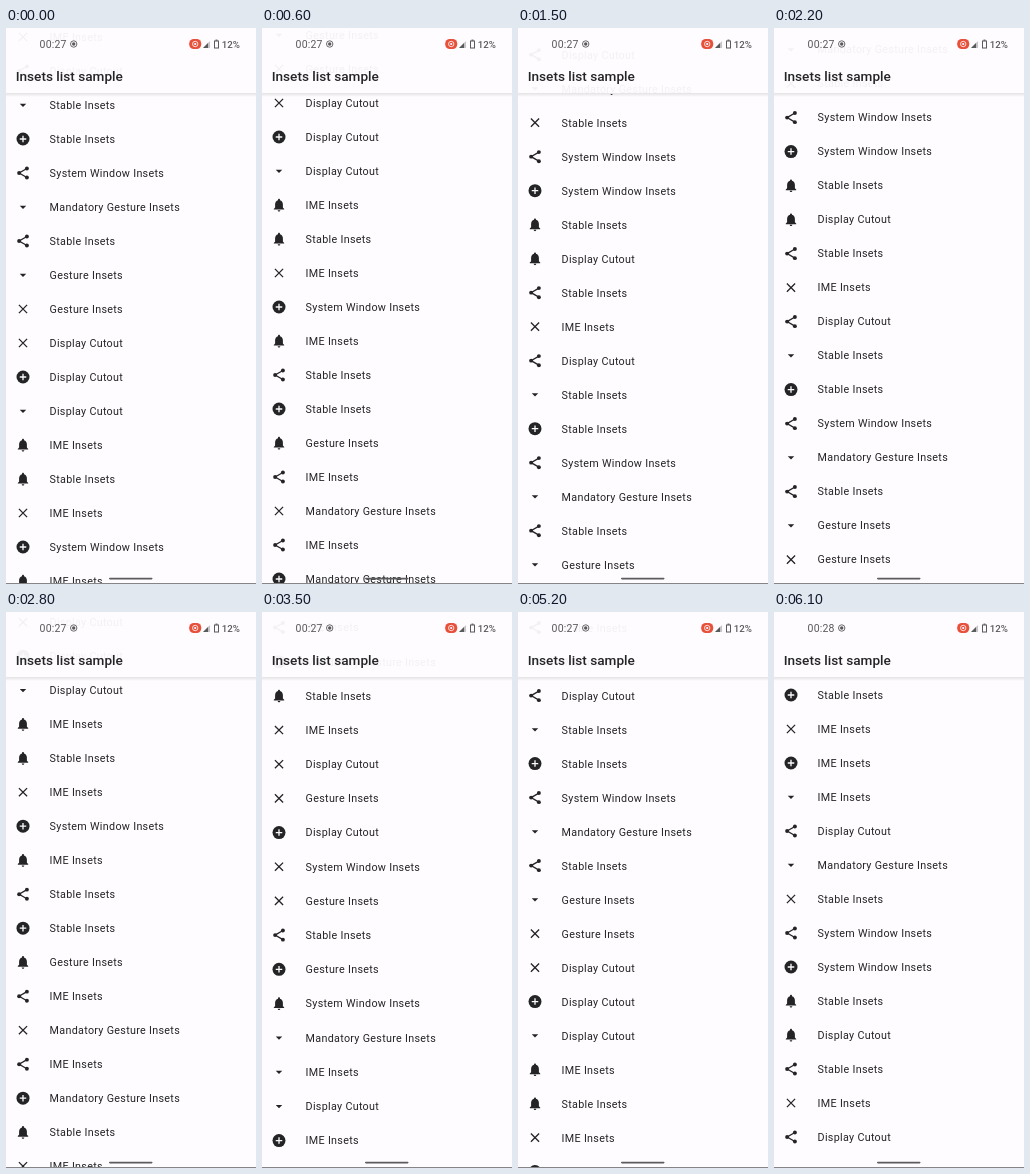
These frames come from a looping animation (250 px wide and 556 px high, 6200 ms). An HTML page with a canvas:

```html
<!DOCTYPE html>
<html lang="en">
<head>
<meta charset="utf-8">
<title>Insets list sample</title>
<style>
  html, body { margin: 0; width: 100%; height: 100%; overflow: hidden; background: #fefcfe; }
  canvas { display: block; width: 250px; height: 556px; }
</style>
</head>
<body>
<canvas id="stage"></canvas>
<script>
const W = 250, H = 556, LOOP = 6200, STEP = 100;
const ROW = 34, FIRST_Y = 83, MAX_SCROLL = 1220, BAR_BOTTOM = 66;
const INK = '#242326', GRAY = '#5a595c', PAPER = '#fefcfe';

const canvas = document.getElementById('stage');
const ctx = canvas.getContext('2d');
const ratio = window.devicePixelRatio || 1;
canvas.width = W * ratio;
canvas.height = H * ratio;

const LABELS = {
  S: 'Stable Insets', W: 'System Window Insets', M: 'Mandatory Gesture Insets',
  G: 'Gesture Insets', D: 'Display Cutout', I: 'IME Insets'
};

// Each row is an icon key followed by a label key.
const ROWS = (
  '+S xI +I vI <D vM xS <W +W bS bD <S xI <D vS +S <W vM <S vG xG xD +D vD bI ' +
  'bS xI +W bI <S +S bG <I xM <I +M bS xI xD xG +D xW xG <S +G bW vM vI vD +I'
).split(' ');

const settle = u => 1 - (1 - u) ** 2;
const gather = u => u ** 1.44;
const linear = u => u;
const smooth = u => u * u * (3 - 2 * u);

// Swipes run one after another; the list rests between them.
const TURN = 738;
const SWIPES = [
  { start: 0, end: 800, from: 482, to: TURN, ease: settle },
  { start: 900, end: 1640, from: TURN, to: 0, ease: gather },
  { start: 1950, end: 3268, from: 0, to: MAX_SCROLL, ease: linear },
  { start: 4500, end: 5680, from: MAX_SCROLL, to: 0, ease: smooth }
];

const BELL = new Path2D(
  'M12 22c1.1 0 2-.9 2-2h-4c0 1.1.89 2 2 2zm6-6v-5c0-3.07-1.64-5.64-4.5-6.32V4' +
  'c0-.83-.67-1.5-1.5-1.5s-1.5.67-1.5 1.5v.68C7.63 5.36 6 7.92 6 11v5l-2 2v1h16v-1l-2-2z');

function disc(x, y, r, color) {
  ctx.fillStyle = color;
  ctx.beginPath();
  ctx.arc(x, y, r, 0, Math.PI * 2);
  ctx.fill();
}

function ring(x, y, r, color, width) {
  ctx.strokeStyle = color;
  ctx.lineWidth = width;
  ctx.beginPath();
  ctx.arc(x, y, r, 0, Math.PI * 2);
  ctx.stroke();
}

function roundBox(x, y, w, h, r, color) {
  ctx.fillStyle = color;
  ctx.beginPath();
  ctx.roundRect(x, y, w, h, r);
  ctx.fill();
}

function strokes(...paths) {
  ctx.lineWidth = 2;
  ctx.beginPath();
  for (const [start, ...rest] of paths) {
    ctx.moveTo(...start);
    for (const point of rest) ctx.lineTo(...point);
  }
  ctx.stroke();
}

function polygon(color, ...points) {
  ctx.fillStyle = color;
  ctx.beginPath();
  for (const point of points) ctx.lineTo(...point);
  ctx.fill();
}

function text(value, x, y, font, color, spacing = 0) {
  ctx.font = font + ' Roboto, sans-serif';
  ctx.letterSpacing = spacing + 'px';
  ctx.fillStyle = color;
  ctx.fillText(value, x, y);
}

// Icons are drawn on a 24 unit grid.
const ICONS = {
  '+'() {
    disc(12, 12, 10, INK);
    ctx.strokeStyle = PAPER;
    strokes([[7, 12], [17, 12]], [[12, 7], [12, 17]]);
  },
  x() {
    strokes([[5.7, 5.7], [18.3, 18.3]], [[18.3, 5.7], [5.7, 18.3]]);
  },
  v() {
    polygon(INK, [7, 10], [17, 10], [12, 15]);
  },
  '<'() {
    const nodes = [[18, 5], [6, 12], [18, 19]];
    strokes(nodes);
    for (const [x, y] of nodes) disc(x, y, 3, INK);
  },
  b() {
    ctx.fillStyle = INK;
    ctx.fill(BELL);
  }
};

function scrollAt(t) {
  const { start, end, from, to, ease } = SWIPES.findLast(swipe => swipe.start <= t);
  const u = Math.min(1, (t - start) / (end - start));
  return from + (to - from) * ease(u);
}

// Rises from 0 to 1 at the peak and falls back.
function bump(t, start, peak, end) {
  if (t <= start || t >= end) return 0;
  const u = t < peak ? (t - start) / (peak - start) : (end - t) / (end - peak);
  return Math.sin(u * Math.PI / 2);
}

function drawRow(row, y) {
  ctx.save();
  ctx.translate(17, y);
  ctx.scale(0.65, 0.65);
  ctx.translate(-12, -12);
  ctx.strokeStyle = INK;
  ICONS[row[0]]();
  ctx.restore();
  text(LABELS[row[1]], 43.6, y + 3.9, '10.75px', INK, 0.3);
}

// Past either end of the list the rows spread away from the pulled edge.
function drawList(t) {
  const scroll = scrollAt(t);
  const bottomPull = 6 * bump(t, 3250, 3350, 3600) + 10 * bump(t, 4000, 4400, 4600);
  const topPull = 6 * bump(t, 5600, 5750, 6100);
  ROWS.forEach((row, i) => {
    const y = FIRST_Y + ROW * i - scroll;
    if (y < -20 || y > H + 20) return;
    const depth = Math.min(1, Math.max(0, y / H));
    drawRow(row, y + topPull * depth ** 0.7 - bottomPull * (1 - depth) ** 0.7);
  });
}

function drawStatus(t) {
  text(t < 5800 ? '00:27' : '00:28', 33.6, 19.8, '10.5px', GRAY, 0.15);
  ring(67.7, 16, 3.2, GRAY, 0.9);
  disc(67.7, 16, 1.7, GRAY);

  roundBox(183.2, 11, 12, 10, 4.5, '#e8503a');
  ring(189.2, 16, 2.7, '#fff', 0.8);
  disc(189.2, 16, 1.1, '#fff');

  polygon('#c4c3c6', [197, 20], [204, 13], [204, 20]);
  polygon(GRAY, [197, 20], [202, 15], [202, 20]);
  ctx.strokeStyle = GRAY;
  ctx.lineWidth = 1;
  ctx.strokeRect(208.5, 13, 4, 7);
  ctx.fillStyle = GRAY;
  ctx.fillRect(209.5, 11.6, 2, 1.2);
  text('12%', 215.8, 19.8, '500 9.7px', GRAY);
}

function drawBar(t) {
  ctx.globalAlpha = 0.95;
  ctx.fillStyle = PAPER;
  ctx.fillRect(0, 0, W, BAR_BOTTOM);
  ctx.globalAlpha = 1;
  const shadow = ctx.createLinearGradient(0, BAR_BOTTOM - 1, 0, BAR_BOTTOM + 3);
  shadow.addColorStop(0, 'rgba(0, 0, 0, 0.1)');
  shadow.addColorStop(1, 'rgba(0, 0, 0, 0)');
  ctx.fillStyle = shadow;
  ctx.fillRect(0, BAR_BOTTOM - 1, W, 4);
  text('Insets list sample', 9.7, 53.2, '500 13.6px', INK);
  drawStatus(t);
}

function drawNavigation() {
  roundBox(103, 549.8, 43.5, 1.6, 0.8, '#5c5b5d');
  ctx.fillStyle = '#858486';
  ctx.fillRect(0, 555, W, 1);
}

function frame(now) {
  const t = Math.floor((now % LOOP) / STEP) * STEP;
  ctx.setTransform(ratio, 0, 0, ratio, 0, 0);
  ctx.fillStyle = PAPER;
  ctx.fillRect(0, 0, W, H);
  drawList(t);
  drawBar(t);
  drawNavigation();
}

const start = performance.now();
function tick() {
  frame(performance.now() - start);
  requestAnimationFrame(tick);
}
tick();
</script>
</body>
</html>
```
